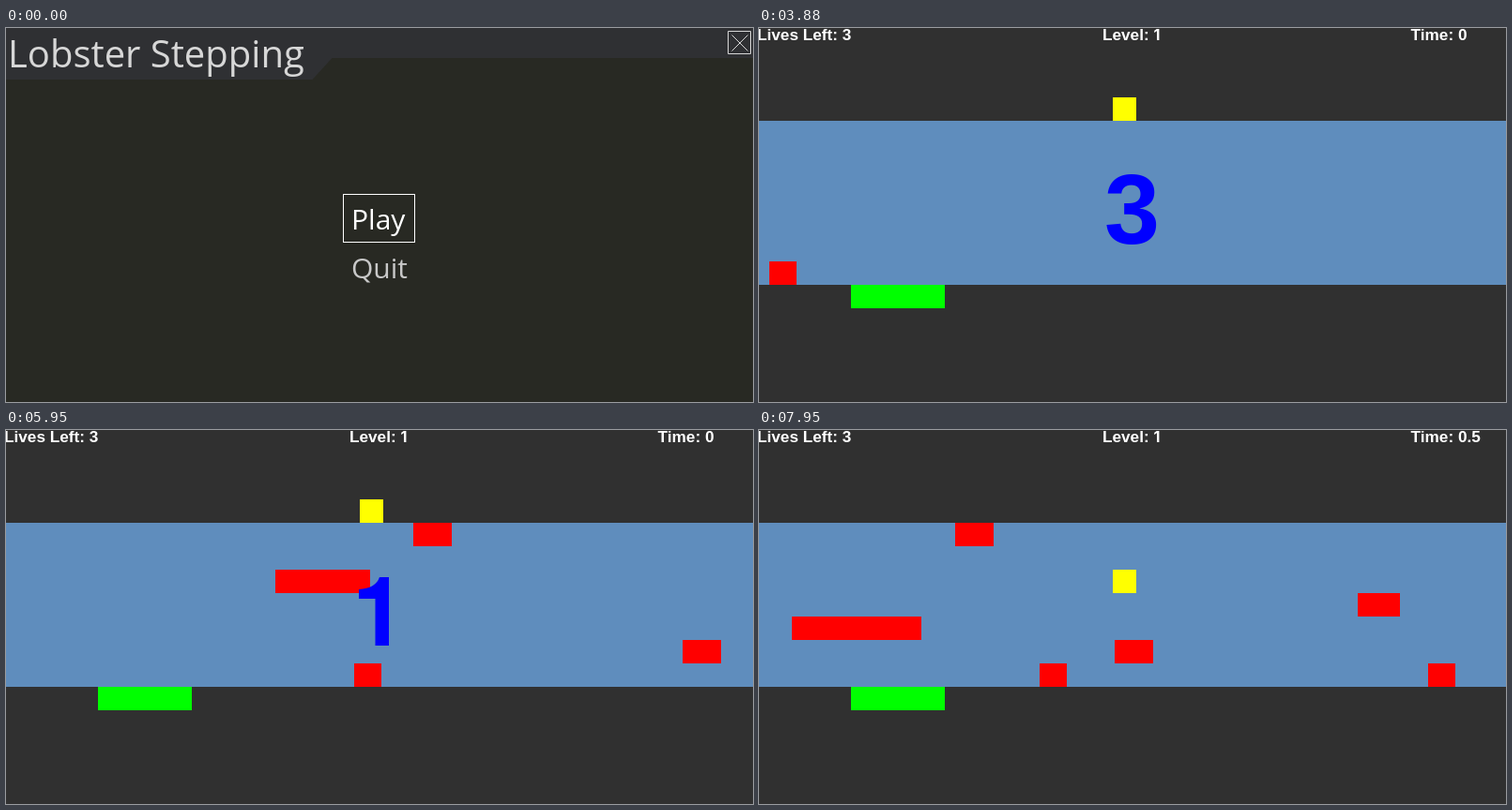
Recreate the animation shown at these times as an HTML page. Size 796 by 399 pixels, loop 8 s.

```html
<!DOCTYPE html>
<html lang="en">
<head>
<meta charset="utf-8">
<title>Lobster Stepping</title>
<style>
  html, body { margin: 0; width: 100%; height: 100%; overflow: hidden; background: #303030; }
  svg { display: block; width: 796px; height: 399px; }
  .menu { font-family: "Open Sans", sans-serif; font-kerning: none; }
  .hud { font: bold 17.2px "Liberation Sans", Arial, sans-serif; fill: #fff; white-space: pre; }
  .plain { font: bold 16.2px Inter, sans-serif; }
  #digit { font: bold 106px "Liberation Sans", Arial, sans-serif; text-anchor: middle; }
</style>
</head>
<body>
<svg viewBox="0 0 796 399">
  <g id="menu" class="menu">
    <rect width="796" height="399" fill="#282923"/>
    <path d="M0 0H796V32H347.5L326.5 55H0Z" fill="#2f3033"/>
    <text x="2" y="42" font-size="40" fill="#d7d7d7">Lobster Stepping</text>
    <path d="M769.5 3.5h24v24h-24zM773.5 7.5l17 17M790.5 7.5l-17 17" fill="none" stroke="#d7d7d7"/>
    <rect x="359.5" y="177.5" width="76" height="51" fill="none" stroke="#fff"/>
    <text x="368" y="215" font-size="30" fill="#fff">Play</text>
    <text x="368" y="267" font-size="30" fill="#c8c8c8">Quit</text>
  </g>
  <g id="game">
    <rect width="796" height="399" fill="#303030"/>
    <rect y="99" width="796" height="175" fill="#5f8dbd"/>
    <rect x="98" y="274" width="100" height="25" fill="#0f0"/>
    <g id="cars" fill="#f00"></g>
    <rect id="player" x="377" width="25" height="25" fill="#ff0"/>
    <g fill="#00f">
      <text id="digit" x="397.5" y="230"></text>
      <path id="one" d="M408 230H393.5V180H376V170Q394 169 398 157H408Z"/>
    </g>
    <g class="hud">
      <text x="-2" y="13">Lives Left: 3</text>
      <text x="366" y="13">Level: <tspan class="plain">1</tspan></text>
      <text id="clock" x="694.6" y="13"></text>
    </g>
  </g>
  <path id="cursor" d="M.5 .5V13L3.5 10.5L6 15.5L8 14.5L5.8 9.5H10Z" fill="#1c1c1c" stroke="#fff"/>
</svg>
<script>
const LOOP = 8000, STEP = 80, GAME_START = 1470;
const COUNT_START = 1460, COUNT_STEP = 940;
const CARS_START = 3633, TICK = 34.8;
const ROW = 25, RIVER_TOP = 99, WIDTH = 796;

const $ = id => document.getElementById(id);
const toggle = (id, on) => $(id).setAttribute("display", on ? "inline" : "none");
const clamp = (v, lo, hi) => Math.min(hi, Math.max(lo, v));
const lerp = (a, b, p) => a + (b - a) * p;

const cars = [];
function addCar(lane, width, speed, spawn) {
  const el = document.createElementNS("http://www.w3.org/2000/svg", "rect");
  el.setAttribute("y", RIVER_TOP + lane * ROW);
  el.setAttribute("width", width);
  el.setAttribute("height", ROW);
  $("cars").append(el);
  cars.push({ el, speed, spawn, from: speed > 0 ? -width - 2 : WIDTH + 3 });
}

// lane, width, speed per tick, spawn tick
addCar(0, 41, 9, 14);
addCar(0, 41, 9, 96);
addCar(2, 101, 10, 28);
addCar(3, 45, -7, 101);
addCar(4, 138, 5, 89);
addCar(5, 41, -6, 54);
addCar(6, 29, 6, 0);
addCar(6, 29, 6, 69);

// The screen refreshes every 80 ms, with one short refresh at 5070.
function refresh(t) {
  const phase = t < 5070 ? 3720 : 5070;
  return t < 3720 ? t : phase + Math.floor((t - phase) / STEP) * STEP;
}

// Eased move between two points, seen in whole steps.
function glide(t, start, steps, ease, from, to) {
  const p = ease(clamp(Math.floor((t - start) / STEP + 1e-6) / steps, 0, 1));
  return from.map((v, i) => Math.round(lerp(v, to[i], p)));
}

function cursorAt(t) {
  const entry = [592, 360], beside = [372, 202], play = [391, 202], exit = [417, 335];
  if (t < 850) return glide(t, 380, 4, p => 1 - (1 - p) ** 1.7, entry, beside);
  if (t < 1230) return glide(t, 770, 2, p => p, beside, play);
  return glide(t, 1150, 4, p => p ** 1.4, play, exit);
}

function drawCursor(t) {
  toggle("cursor", t >= 380 && t < 1550);
  $("cursor").setAttribute("transform", `translate(${cursorAt(t)})`);
}

function drawGame(t) {
  const tick = Math.floor((t - CARS_START) / TICK + 0.55);
  for (const { el, speed, spawn, from } of cars) {
    el.setAttribute("x", from + speed * Math.max(0, tick - spawn));
  }

  const left = 5 - Math.floor((t - COUNT_START) / COUNT_STEP);
  toggle("digit", left >= 0 && left !== 1);
  toggle("one", left === 1);
  $("digit").textContent = left;

  const played = Math.max(0, t - COUNT_START - 6 * COUNT_STEP);
  $("clock").textContent = "Time: " + Math.floor(played / 500) / 2;

  const hops = clamp(Math.floor((t - 7390) / (2 * STEP)), 0, 3);
  $("player").setAttribute("y", RIVER_TOP + (hops - 1) * ROW);
}

function draw(t) {
  const playing = t >= GAME_START;
  toggle("menu", !playing);
  toggle("game", playing);
  if (playing) drawGame(refresh(t));
  drawCursor(t);
}

const start = performance.now();
function frame() {
  draw((performance.now() - start) % LOOP);
  requestAnimationFrame(frame);
}
frame();
</script>
</body>
</html>
```
